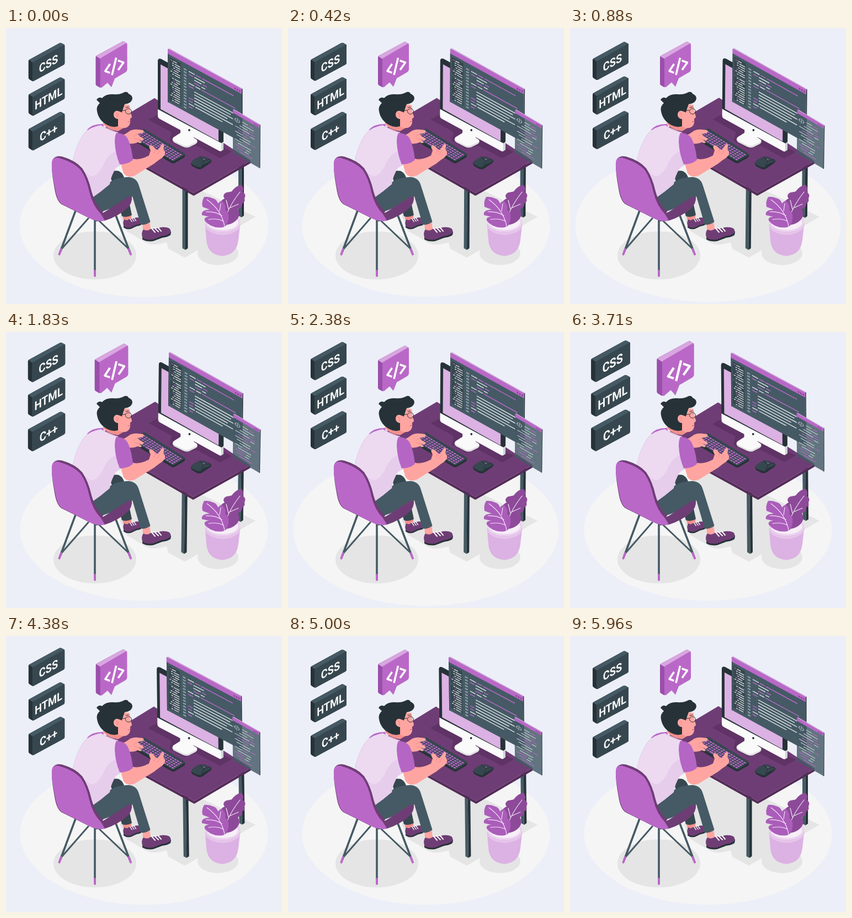
An HTML page with a canvas for the animation above (6000 ms loop, 500x500 px).

```html
<!DOCTYPE html>
<html lang="en">
<head>
<meta charset="utf-8">
<title>Programming</title>
<style>
html, body { margin: 0; width: 100%; height: 100%; overflow: hidden; background: #eceff8; }
canvas { display: block; width: 100vw; height: 100vh; }
</style>
</head>
<body>
<canvas id="stage"></canvas>
<script>
const LOOP = 6000, TAU = Math.PI * 2;
const INK = '#263238', SLATE = '#37474f', STEEL = '#455a64';
const LILAC = '#ba68c8', PALE = '#dcb1e3', PLUM = '#6f3d75', DEEP = '#542c59';
const SKIN = '#ffa5a1', WHITE = '#fafafa', SHADE = '#e5e5e5';
const canvas = document.getElementById('stage');
const ctx = canvas.getContext('2d');
const paths = new Map();

function path(d) {
  if (!paths.has(d)) paths.set(d, new Path2D(d));
  return paths.get(d);
}
function fill(d, color) {
  ctx.fillStyle = color;
  ctx.fill(path(d));
}
function line(d, color, width) {
  ctx.strokeStyle = color;
  ctx.lineWidth = width;
  ctx.stroke(path(d));
}
function oval(x, y, rx, ry, color, turn = 0) {
  ctx.fillStyle = color;
  ctx.beginPath();
  ctx.ellipse(x, y, rx, ry, turn, 0, TAU);
  ctx.fill();
}
function group(draw) {
  ctx.save();
  draw();
  ctx.restore();
}
// Slanted panel: u runs along the slope, v straight down
function panel(x, y, slope, draw) {
  group(() => { ctx.transform(1, slope, 0, 1, x, y); draw(); });
}
function bar(u, v, w, h, color) {
  ctx.fillStyle = color;
  ctx.fillRect(u, v, w, h);
}

// One eased bump per period: rises from a to b, falls back by c
function beat(t, period, a, b, c) {
  let p = t % period;
  if (p > period + a) p -= period;
  if (p <= a || p >= c) return 0;
  const k = p < b ? (p - a) / (b - a) : (c - p) / (c - b);
  return (1 - Math.cos(Math.PI * k)) / 2;
}
function scaleAt(x, y, s) {
  ctx.translate(x, y);
  ctx.scale(s, s);
}

function ground(t) {
  const s = 1 + 0.092 * beat(t, 750, -10, 68, 265);
  oval(250, 358, 224.5 * s, 129 * s, '#f5f5f5');
  fill('M206 342L222 268L232 240L345 290L452 342L324 416L294 400L291 388Q262 398 246 384L218 368Z', SHADE);
  oval(161, 412, 75, 43.5, SHADE);
  oval(384, 408, 37, 21.5, SHADE);
}

function monitor() {
  // shadow on the table top
  fill('M258 166L274 157L409 224L388 236L345 213L322 219L296 204L300 189Z', '#5f3365');
  fill('M302 204Q300 201 305 198L316 191L316 178L340 191L340 200L345 203Q349 206 344 210L332 216Q326 218 320 215L304 207Z', '#e0e0e0');
  fill('M303 202Q301 199 305 197L316 190L316 176L338 189L339 198L345 202Q348 204 344 207L331 213Q326 215 320 212L304 204Z', WHITE);
  fill('M316 183L338 195L338 189L316 176Z', '#dedede');
  fill('M275 60Q275 54 281 56L389 115Q394 118 394 124L394 206L390 209L275 148Z', INK);
  fill('M280 66L385 123L385 205L280 147Z', PALE);
  fill('M275 147L390 208.5L390 223Q388 224 385 222L279 165Q275 163 275 159Z', WHITE);
  fill('M390 208.5L394 206L394 220.5L390 223Z', '#d0d4d8');
  oval(332, 185, 1.9, 2.1, INK);
}

function codeWindow() {
  fill('M293 38L296 37L429 110L427 112Z', '#d39ada');
  fill('M427 111L428.5 110L428.5 206L427 207Z', INK);
  panel(293, 38, 0.545, () => {
    bar(0, 0, 134, 96, STEEL);
    bar(0, 0, 134, 8.5, LILAC);
    bar(0, 8.5, 1.2, 87.5, SLATE);
    for (let i = 0; i < 3; i++) oval(122 + i * 4.2, 5, 1.3, 1.5, '#7b3f87');
    bar(3, 13, 21, 31, SLATE);
    bar(3, 47, 21, 43, SLATE);
    for (let i = 0; i < 18; i++) {
      const v = 16 + i * 4 + (i > 6 ? 3.5 : 0);
      const indent = [0, 3, 3, 5, 2][i % 5];
      const w = 7 + (i * 7) % 9;
      bar(5 + indent, v, 3, 1.4, i % 4 ? '#e8ebee' : LILAC);
      bar(9.5 + indent, v, Math.min(w, 13 - indent), 1.4, '#e8ebee');
    }
    for (let i = 0; i < 14; i++) bar(29, 18.5 + i * 5.3, 5, 2.5, '#90a0a8');
    // row, start, length, tint
    const rows = [
      [0, 38, 11, 0], [0, 51, 9, 1], [0, 62, 57, 1],
      [1, 38, 8, 1], [1, 48, 19, 0],
      [2, 48, 13, 0], [2, 63, 8, 1],
      [3, 48, 11, 1], [3, 61, 7, 0],
      [4, 38, 10, 0], [4, 50, 9, 0], [4, 61, 61, 1],
      [5, 38, 9, 1],
      [6, 48, 72, 0], [7, 48, 66, 0], [8, 48, 76, 0],
      [9, 38, 8, 1], [9, 48, 60, 0], [10, 38, 7, 1], [10, 48, 70, 0],
      [11, 38, 10, 0], [11, 50, 49, 0], [12, 38, 7, 1]
    ];
    for (const [r, u, w, tint] of rows) bar(u, 19 + r * 5.3, w, 1.6, tint ? LILAC : '#dfe4e7');
  });
}

function smallWindow() {
  fill('M411 148L413 147L461 175L459.5 177Z', '#d39ada');
  fill('M459.5 176.5L461 175L460.5 253L459 254.5Z', SLATE);
  panel(411, 148, 0.575, () => {
    ctx.globalAlpha = 0.82;
    bar(0, 0, 48.5, 78, STEEL);
    ctx.globalAlpha = 1;
    bar(0, 0, 48.5, 5.5, LILAC);
    for (let i = 0; i < 3; i++) oval(39 + i * 3, 3.2, 0.9, 1.1, '#7b3f87');
    line('M6 12L3.5 15L6 18M8.5 10.5L7.5 19.5M10 12L12.5 15L10 18', '#c9d1d5', 0.9);
    for (let i = 0; i < 13; i++) {
      const v = 12 + i * 4.7;
      const u = i < 2 ? 17 : [4, 7, 12, 4, 9][i % 5];
      const w = 10 + (i * 11) % 17;
      const tint = i === 4 || i > 9;
      bar(u, v, w, 1.2, tint ? LILAC : '#c9d1d5');
      if (u + w < 32) bar(u + w + 2, v, 8, 1.2, tint ? '#c9d1d5' : LILAC);
    }
  });
}

function keyboard() {
  fill('M249 185Q251 184 253 186L324 229Q325 233 322 235L305 245Q302 246 299 244L229 203L229 198Z', INK);
  fill('M248 183Q250 182 253 184L323 227Q325 229 322 231L305 241Q302 242 299 240L229 198Z', SLATE);
  group(() => {
    ctx.transform(0.86, 0.52, -0.84, 0.52, 249.5, 185.5);
    for (let r = 0; r < 5; r++) {
      for (let c = 0; c < 15; c++) {
        if (r === 4 && c > 3 && c < 9) continue;
        bar(2 + c * 5.5, 2 + r * 4.3, 3.9, 2.7, LILAC);
      }
    }
    bar(24, 19.2, 26, 2.7, LILAC);
  });
}

function desk() {
  fill('M421 240L426.5 240L426.5 343L421 340Z', STEEL);
  fill('M426.5 240L431 240L431 340L426.5 343Z', INK);
  fill('M319.5 285L325 285L325 402L319.5 399Z', STEEL);
  fill('M325 285L329.5 285L329.5 399L325 402Z', INK);
  fill('M155 195L340 299L443 240L443 245L340 304L155 200Z', DEEP);
  fill('M269 127L443 240L340 299L155 195Z', PLUM);
  monitor();
  keyboard();
  fill('M335 246Q336 241 343 237L352 233Q359 232 366 236L372 239Q373 243 368 246L355 255Q351 257 346 255L337 250Z', INK);
  fill('M336 244Q338 239 346 235Q354 232 361 234L371 239Q370 243 362 245Q357 247 353 252Q347 253 336 246Z', SLATE);
  line('M350 234L359 240L370 238M359 240L354 250', INK, 1);
  line('M357 237L360 239', LILAC, 1.4);
  codeWindow();
  smallWindow();
}

function plant() {
  fill('M360.5 354L363 384Q365 411 392 413Q418 411 421 384L424.5 354Z', PALE);
  oval(392.5, 352, 32, 17.5, '#ecd3f0');
  oval(392.5, 352, 28, 14, '#f7eef8');
  fill('M394 357Q387 344 391 331L389 319Q389 311 396 309Q391 302 399 298Q406 297 409 296Q416 286 426 284Q432 288 429 297Q436 301 432 309Q434 315 428 318Q428 326 420 328Q425 337 420 345Q411 357 394 357Z', '#8d4a99');
  line('M394 355Q401 326 424 297M405 326L421 319M403 328L399 312', '#f2e4f5', 1.2);
  fill('M393 361Q372 364 360 349Q358 342 368 342L355 339Q353 333 361 330L369 329L356 324Q354 314 359 306Q367 305 376 309Q382 311 384 318Q390 310 394 316Q399 323 397 330L402 334Q406 345 399 358Z', '#ab5dba');
  line('M396 359Q390 329 364 311M391 340Q379 332 362 333M394 350Q382 344 367 347M387 331L389 318', '#f2e4f5', 1.2);
  fill('M361 356Q371 369 392 370Q415 369 424 356L423 363Q413 374 392 375Q372 374 362 363Z', '#e5c4ea');
}

function chairLegs() {
  line('M149 345L101 400M164 345L222 400M177 344L164 349', STEEL, 3);
  line('M126 331L98.5 405M198 337L224 405M161 344L161 444', STEEL, 3.6);
  line('M100 401L96.5 410M222.5 401L226 410M161 440L161 449', LILAC, 4);
}

function shoe(x, y) {
  group(() => {
    ctx.translate(x, y);
    fill('M0 10Q-2 2 2 -2Q9 2 15 -3Q24 -3 34 -7Q45 -8 50 -4Q53 0 51 6Q46 10 36 11L20 17Q8 19 0 14Z', INK);
    fill('M0 8Q-2 0 2 -4Q9 0 15 -5Q24 -5 34 -8Q45 -9 50 -5Q52 -1 50 3Q45 7 35 8L20 14Q8 16 0 11Z', PLUM);
    line('M17 -6L23 1M22 -7L29 0M28 -8L34 -1', WHITE, 2);
  });
}

function legs() {
  fill('M209 333L226 333L228 350L214 352Z', '#f28f8c');
  group(() => {
    ctx.translate(213, 350);
    ctx.scale(0.66, 0.82);
    ctx.translate(-246, -370);
    shoe(246, 370);
  });
  fill('M187 264Q193 257 204 259Q215 264 216 282L228 339Q219 344 210 341L196 290Z', SLATE);
  fill('M247 350L260 348L262 364Q254 370 248 365Z', SKIN);
  shoe(247, 369);
  fill('M155 300Q170 291 187 280Q200 270 222 270Q237 271 241 286L261.5 351Q253 358 244 356L229 305L200 323L168 335Z', STEEL);
}

function farArm() {
  fill('M202 197Q213 195 222 188Q229 183 239 184L248 185Q251 187 248 190L239 192L242 196L249 200Q250 203 246 204L241 202L246 207Q244 210 239 207Q230 211 220 209L203 216Z', SKIN);
  line('M239 192L232 196M241 202L233 200', '#f08a88', 1);
}

function torso() {
  fill('M146 185Q156 173 176 174L178 181Z', LILAC);
  fill('M172 176Q155 178 142 190Q127 209 120 243Q130 258 145 279L157 307Q173 296 188 283Q190 268 199 254L211 246Q201 212 203 189Q191 186 172 176Z', '#e7cdec');
  fill('M171 177Q155 179 143 191Q128 210 121 243Q139 262 156 269Q170 264 177 246Q184 230 200 222L200 190Q187 187 171 177Z', '#eddaf1');
  fill('M175 172Q182 184 203 187L213 181L203 165Z', '#f28f8c');
}

function nearArm() {
  fill('M207 243L230 237Q242 240 259 231L262 222Q257 214 262 212Q267 213 271 220L275 221L282 211Q287 208 286 215L285 220Q289 223 288 228Q286 234 277 239L268 246L234 267Q220 273 213 263Z', SKIN);
  line('M271 220L268 227M279 222L274 229', '#f08a88', 1);
  fill('M200 190Q212 190 219 198Q227 211 230 239Q221 247 206 247Q198 228 197 207Q197 195 200 190Z', '#b566c4');
}

function head() {
  fill('M206 138L223 139Q226 145 225 151L228 160Q228 163 225 164L225 171Q224 179 216 181Q208 182 200 177L194 157Z', SKIN);
  fill('M164 130Q168 124 174 127Q181 119 194 120Q204 121 211 118Q219 113 222 119Q229 122 229 128Q227 137 215 138Q212 145 210 153L205 151Q196 148 195 157Q197 165 203 165L203 178Q193 181 184 176Q168 168 165 151Q163 142 170 136Z', INK);
  oval(201, 157, 6, 7, SKIN);
  line('M199 154Q204 155 202 161', '#ef8583', 1);
  line('M206 150L216 149', INK, 1);
  ctx.strokeStyle = INK;
  ctx.lineWidth = 1;
  ctx.beginPath();
  ctx.ellipse(222, 151, 5.5, 5, 0.1, 0, TAU);
  ctx.stroke();
  line('M217 144L222 143', INK, 1.2);
  line('M221 170L225 169', '#d96a70', 1.1);
}

function chair() {
  fill('M158 333Q166 340 179 333L218 308Q226 303 228 306Q229 317 220 326Q204 341 179 349Q165 351 158 344Z', PLUM);
  fill('M84 240Q88 230 102 233Q126 240 138 254Q149 270 155 296Q162 321 176 332Q172 345 160 348L150 344L100 319Q91 312 88 291Q81 255 84 240Z', PLUM);
  fill('M83.5 241Q87 232 98 236Q124 244 136 258Q146 273 151 297Q157 322 172 337Q176 343 179 349Q165 352 150 344L100 318Q92 311 89 291Q81 254 83.5 241Z', LILAC);
}

function tag(text, y, s) {
  group(() => {
    scaleAt(73.5, y, s);
    fill('M-32.5 -2Q-32.5 -4 -30 -5L23 -34Q25 -35 27 -34L32.5 -31L32.5 2Q32.5 4 30 5L-23 34Q-25 35 -27 33.5L-31 31Q-32.5 30 -32.5 28Z', INK);
    fill('M-31.5 -4L23 -34Q25 -35 27 -34L32 -31L-25 1Z', STEEL);
    fill('M-25.5 3Q-25.5 1 -23 -0.5L30 -30Q32.5 -31 32.5 -28L32.5 2Q32.5 4 30 5.5L-23 34Q-25.5 35 -25.5 32Z', SLATE);
    ctx.transform(0.866, -0.5, 0, 1, 3.5, 2.5);
    ctx.font = '700 21px Roboto, sans-serif';
    ctx.textAlign = 'center';
    ctx.textBaseline = 'alphabetic';
    ctx.fillStyle = WHITE;
    ctx.fillText(text, 0, 7.5);
  });
}

function bubble(s) {
  group(() => {
    scaleAt(191, 66, s);
    fill('M-28 -13Q-28 -15 -26 -16L19 -40.5Q21 -42 23 -40.5L28 -37L-20 41.5L-26 38Q-28 37 -28 35Z', '#9a4faa');
    fill('M-27.5 -15L19 -40.5Q21 -42 23 -40.5L27 -38L-20 -10Z', '#d9a6e0');
    fill('M-20 -9Q-20 -11 -18 -12L25 -37Q28 -38 28 -35L28 9Q28 12 25 14L6 25L0 40.5L-7 32.5L-17 41Q-20 42 -20 39Z', LILAC);
    ctx.lineCap = 'butt';
    line('M-2.5 -1L-11 12L-2.5 15M8.5 -12L1 19M11.5 -7L21.5 -3.5L12 10', WHITE, 3.6);
  });
}

function draw(t) {
  ctx.setTransform(canvas.width / 500, 0, 0, canvas.height / 500, 0, 0);
  ctx.lineCap = 'round';
  ctx.lineJoin = 'round';
  bar(0, 0, 500, 500, '#eceff8');
  const phase = TAU * t / LOOP;

  ground(t);
  group(() => {
    ctx.translate(334, 219);
    ctx.rotate(0.0122 * Math.sin(phase));
    ctx.translate(-334, -219);
    ctx.lineCap = 'butt';
    desk();
  });
  plant();
  chairLegs();
  farArm();
  legs();
  torso();
  nearArm();
  head();
  chair();

  const pulse = beat(t, 600, -25, 100, 195);
  const rise = 5 * (1 - Math.cos(phase));
  ['CSS', 'HTML', 'C++'].forEach((text, i) => tag(text, 61.7 - rise + i * 62.6, 1 + 0.092 * pulse));
  bubble(1 + 0.21 * pulse);
}

function resize() {
  const ratio = window.devicePixelRatio || 1;
  canvas.width = Math.round(innerWidth * ratio);
  canvas.height = Math.round(innerHeight * ratio);
}
window.addEventListener('resize', resize);
resize();

let start = null;
function frame(now) {
  if (start === null) start = now;
  draw((now - start) % LOOP);
  requestAnimationFrame(frame);
}
draw(0);
requestAnimationFrame(frame);
</script>
</body>
</html>
```
